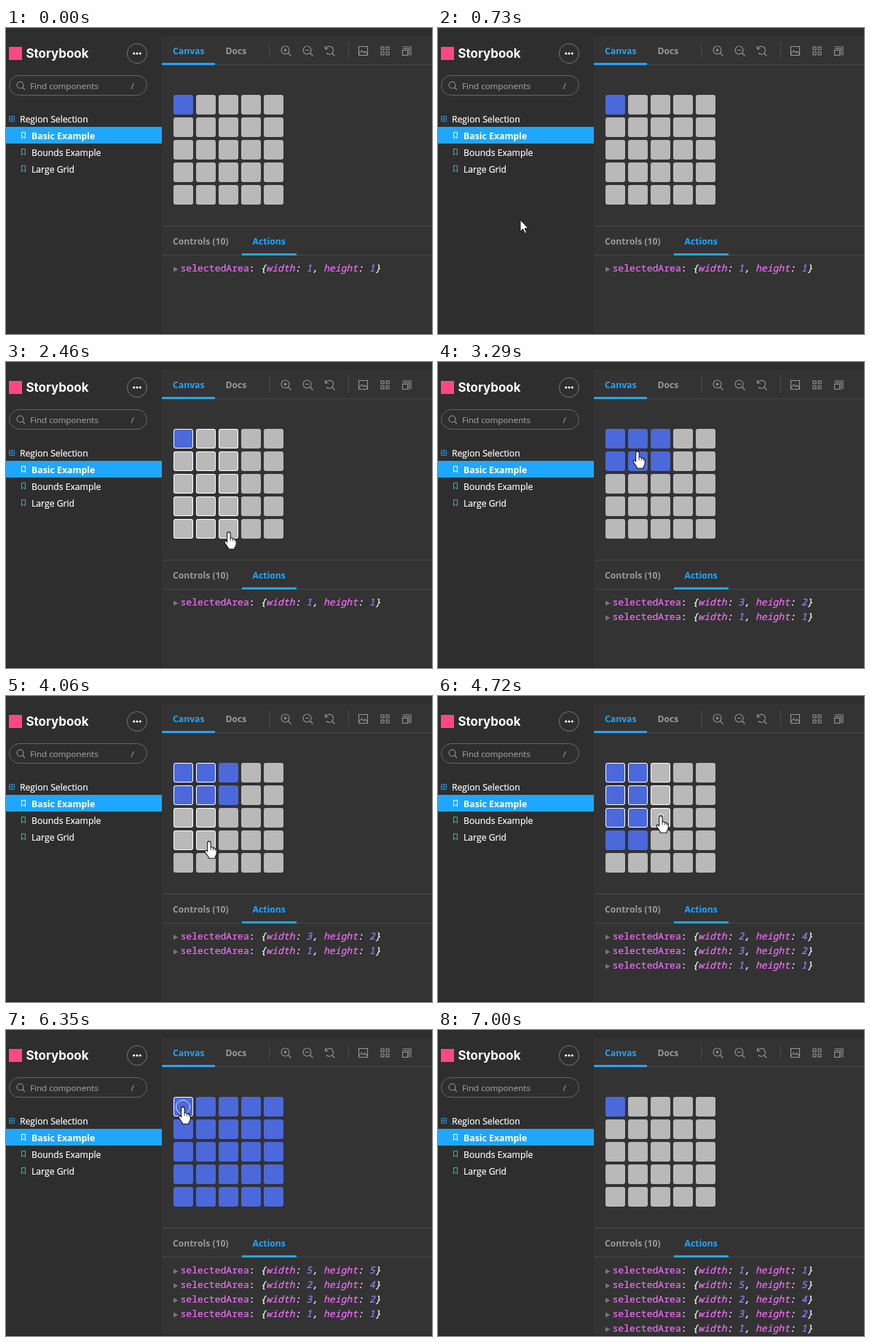
Recreate the animation shown at these times as an HTML page. Size 585 by 421 pixels, loop 7.93 s.

```html
<!DOCTYPE html>
<html lang="en">
<head>
<meta charset="utf-8">
<title>Region selection</title>
<style>
  html, body { margin: 0; width: 100%; height: 100%; overflow: hidden; background: #2e2e2e; }
  svg { display: block; --c: #fff; }
  text, tspan { fill: var(--c); stroke: var(--c); stroke-width: .2px; white-space: pre; }
  text { font: 12.2px "Open Sans", "Noto Sans", sans-serif; }
  .bold, .tab, .brand { font-weight: 700; stroke-width: 0; }
  .bold { font-size: 12.3px; }
  .brand { font-family: Inter, "Open Sans", sans-serif; font-size: 16.9px; }
  .tab, .hint { --c: #999; }
  .on { --c: #1ea7fd; }
  rect.on { fill: var(--c); }
  .hint { font-size: 11.6px; }
  .log text { font: 13.1px "Noto Sans Mono", "DejaVu Sans Mono", monospace; }
  .key { --c: #f36ffa; }
  .num { --c: #9980ff; }
  .it { font-style: italic; }
  .icon { fill: none; stroke: #999; stroke-width: 1.1; }
  .line { fill: #474747; }
</style>
</head>
<body>
<svg width="585" height="421" viewBox="0 0 585 421">
  <rect width="585" height="421" fill="#2e2e2e"/>
  <rect x="214" y="11" width="371" height="410" fill="#333"/>

  <!-- sidebar -->
  <rect x="4" y="26" width="18" height="18" fill="#ff4785"/>
  <text class="brand" x="27.5" y="41">Storybook</text>
  <circle cx="180" cy="35" r="13.5" fill="none" stroke="#777"/>
  <path d="M175.7 35h9" stroke="#fff" stroke-width="3.2" stroke-linecap="round" stroke-dasharray="0 4.3"/>
  <rect x="4.500" y="65.500" width="189" height="27" rx="13.5" fill="none" stroke="#666"/>
  <path class="icon" d="M23 82l3 3M24 78.500a4.500 4.500 0 1 1-9 0a4.500 4.500 0 1 1 9 0"/>
  <text class="hint" x="33" y="84">Find components</text>
  <text class="hint" x="171.500" y="84">/</text>
  <path d="M4.500 121.500h7v7h-7zM8 121.500v7M4.500 125h7" fill="none" stroke="#1e8fd5"/>
  <text x="19" y="130">Region Selection</text>
  <rect class="on" y="136" width="214" height="23"/>
  <g id="items"></g>

  <!-- toolbar -->
  <text class="tab on" x="229" y="36">Canvas</text>
  <text class="tab" x="301.500" y="36">Docs</text>
  <rect class="line" x="214" y="50" width="371" height="1"/>
  <rect class="on" x="214" y="48" width="73" height="3"/>
  <rect class="line" x="361" y="19" width="1" height="24"/>
  <rect class="line" x="470" y="19" width="1" height="24"/>
  <g class="icon">
    <g id="lens"><circle cx="383.500" cy="30.500" r="5.500"/><path d="M387.500 34.500l4 4M381 30.500h5"/></g>
    <use href="#lens" x="30"/>
    <path d="M383.500 28v5M438.500 25v4h4M439 28.500a5.500 5.500 0 1 1 1 6M447.500 34.500l4 4"/>
    <path d="M484.500 25.500h12v12h-12zM485 35l3.500-4 2.500 3 2-2 3.500 3.500"/>
    <path d="M515 26h4v4h-4zM522 26h4v4h-4zM515 33h4v4h-4zM522 33h4v4h-4z"/>
    <path d="M544.500 30.500h7v7h-7zM544.500 28.500h9v9M544.500 26h11.500v11.500"/>
  </g>

  <g id="grid"></g>

  <!-- actions panel -->
  <rect class="line" x="214" y="272" width="371" height="1"/>
  <text class="tab" x="229" y="298">Controls (10)</text>
  <text class="tab on" x="338.500" y="298">Actions</text>
  <rect class="line" x="214" y="312" width="371" height="1"/>
  <rect class="on" x="324" y="310" width="75" height="3"/>
  <g id="log" class="log"></g>
  <rect y="420" width="585" height="1" fill="#242424"/>

  <circle id="ring" fill="none" stroke="#dfe5ff"/>
  <g id="cursor" fill="#fff" stroke="#111" stroke-linejoin="round">
    <path id="arrow" d="M0 0V16L3.700 12.600 6.200 18.400 8.600 17.400 6.100 11.800H11Z"/>
    <g id="hand" transform="scale(1.06)">
      <path d="M-2.200 2a2 2 0 0 1 4.200 0V7.500Q4.200 6.800 5 8.600 7.200 7.900 7.800 9.700 9.600 9.400 9.600 11.500V15.500Q9.600 18 7.600 20V22H-.8V20.300L-5 14.500Q-6.300 12 -4.600 11.400-3.400 11.300-2.200 13.200Z"/>
      <path d="M2 7.500v4M5 8.600v3.200M7.800 9.700v2.500" fill="none" stroke-width=".8"/>
    </g>
  </g>
</svg>
<script>
const LOOP = 7930, STEP = 60, SIDE = 5, PITCH = 31, CELL = 27, LEFT = 230, TOP = 92;
const EDGE = [-14, 428], HOME = [243, 106];
const $ = id => document.getElementById(id);

const drags = [
  { press: 1270, release: 2930, size: [3, 2] },
  { press: 3770, release: 4360, size: [2, 4] },
  { press: 4600, release: 5150, size: [5, 5] },
  { press: 6350, release: 6470, size: [1, 1] }
];

// each move starts where the one before ended; bend is a curve's control point
const moves = [
  { start: 370, end: 1150, to: [240, 99] },
  { start: 1390, end: 2050, to: [381, 149] },
  { start: 2110, end: 2880, to: [305, 140], bend: [258, 326] },
  { start: 2930, end: 3710, to: HOME },
  { start: 3770, end: 4180, to: [262, 200], bend: [304, 227] },
  { start: 4360, end: 4540, to: HOME },
  { start: 4600, end: 4900, to: [369, 223] },
  { start: 5390, end: 5920, to: HOME },
  { start: 6470, end: 7000, to: EDGE }
];
const shown = t => t >= moves[0].start && t < moves[moves.length - 1].end;

// outlines stay until the pointer moves off after the release
for (const d of drags) d.clear = moves.find(m => m.start >= d.release).start + STEP;

function add(parent, tag, attrs, text) {
  const el = document.createElementNS("http://www.w3.org/2000/svg", tag);
  for (const k in attrs) el.setAttribute(k, attrs[k]);
  if (text) el.textContent = text;
  return parent.appendChild(el);
}

["Basic Example", "Bounds Example", "Large Grid"].forEach((name, i) => {
  const y = 148 + i * 23;
  add($("items"), "path", {
    d: `M21.500 ${y - 4.5}h5v8.500l-2.500-2.500-2.500 2.500z`,
    fill: "none", stroke: i ? "#35b8b4" : "#fff"
  });
  add($("items"), "text", { x: 35, y: y + 5, class: i ? "" : "bold" }, name);
});

const cells = Array.from({ length: SIDE * SIDE }, (_, i) => {
  const col = i % SIDE, row = Math.floor(i / SIDE);
  const g = add($("grid"), "g", { transform: `translate(${LEFT + col * PITCH} ${TOP + row * PITCH})` });
  return {
    col, row,
    fill: add(g, "rect", { width: CELL, height: CELL, rx: 3 }),
    edge: add(g, "rect", { x: .5, y: .5, width: CELL - 1, height: CELL - 1, rx: 2.5, fill: "none", stroke: "#fff" })
  };
});

const entries = [[1, 1], ...drags.map(d => d.size)].map(([w, h]) => {
  const g = add($("log"), "g", {});
  add(g, "path", { d: "M230 328.500l6.500 3.500-6.500 3.500z", fill: "#777" });
  const text = add(g, "text", { x: 239.5, y: 335 });
  const span = (cls, s) => add(text, "tspan", { class: cls }, String(s));
  const field = (name, value, after) => {
    span("key it", name);
    span("it", ": ");
    span("num it", value);
    span("it", after);
  };
  span("key", "selectedArea");
  span("", ": ");
  span("it", "{");
  field("width", w, ", ");
  field("height", h, "}");
  return g;
});

const show = (el, on) => el.setAttribute("visibility", on ? "inherit" : "hidden");
const smooth = u => u * u * (3 - 2 * u);

// the pointer jumps once per step, the first time at the start of a move
function pointer(t) {
  const i = moves.findLastIndex(m => m.start <= t);
  if (i < 0) return EDGE;
  const { start, end, to, bend } = moves[i];
  const from = i ? moves[i - 1].to : EDGE;
  const ticks = Math.floor((t - start) / STEP) + 1;
  const u = Math.min(1, ticks * STEP / (end - start + STEP));
  return to.map((b, k) => bend
    ? from[k] * (1 - u) ** 2 + 2 * bend[k] * u * (1 - u) + b * u * u
    : from[k] + (b - from[k]) * smooth(u));
}

const index = d => Math.min(SIDE - 1, Math.max(0, Math.floor(d / PITCH)));

function draw(t) {
  const [x, y] = pointer(t).map(Math.round);
  const drag = drags.find(d => t >= d.press && t < d.clear);
  const done = drags.filter(d => t >= d.release).length;
  const [cols, rows] = done ? drags[done - 1].size : [1, 1];
  const right = index(x - LEFT), bottom = index(y - TOP);

  for (const c of cells) {
    c.fill.setAttribute("fill", c.col < cols && c.row < rows ? "#4b69db" : "#b9b9b9");
    show(c.edge, drag && c.col <= right && c.row <= bottom);
  }

  entries.forEach((g, i) => {
    show(g, i <= done);
    g.setAttribute("transform", `translate(0 ${(done - i) * 20})`);
  });

  const size = SIDE * PITCH;
  const over = x >= LEFT && x < LEFT + size && y >= TOP && y < TOP + size;
  $("cursor").setAttribute("transform", `translate(${x} ${y})`);
  show($("cursor"), shown(t));
  show($("hand"), over);
  show($("arrow"), !over);

  const age = drag ? Math.floor((t - drag.press) / STEP) : Infinity;
  show($("ring"), age < 3);
  $("ring").setAttribute("cx", x);
  $("ring").setAttribute("cy", y);
  $("ring").setAttribute("r", Math.max(0, 9.5 - age * 3));
}

const begin = performance.now();
function tick() {
  draw((performance.now() - begin) % LOOP);
  requestAnimationFrame(tick);
}
tick();
</script>
</body>
</html>
```
